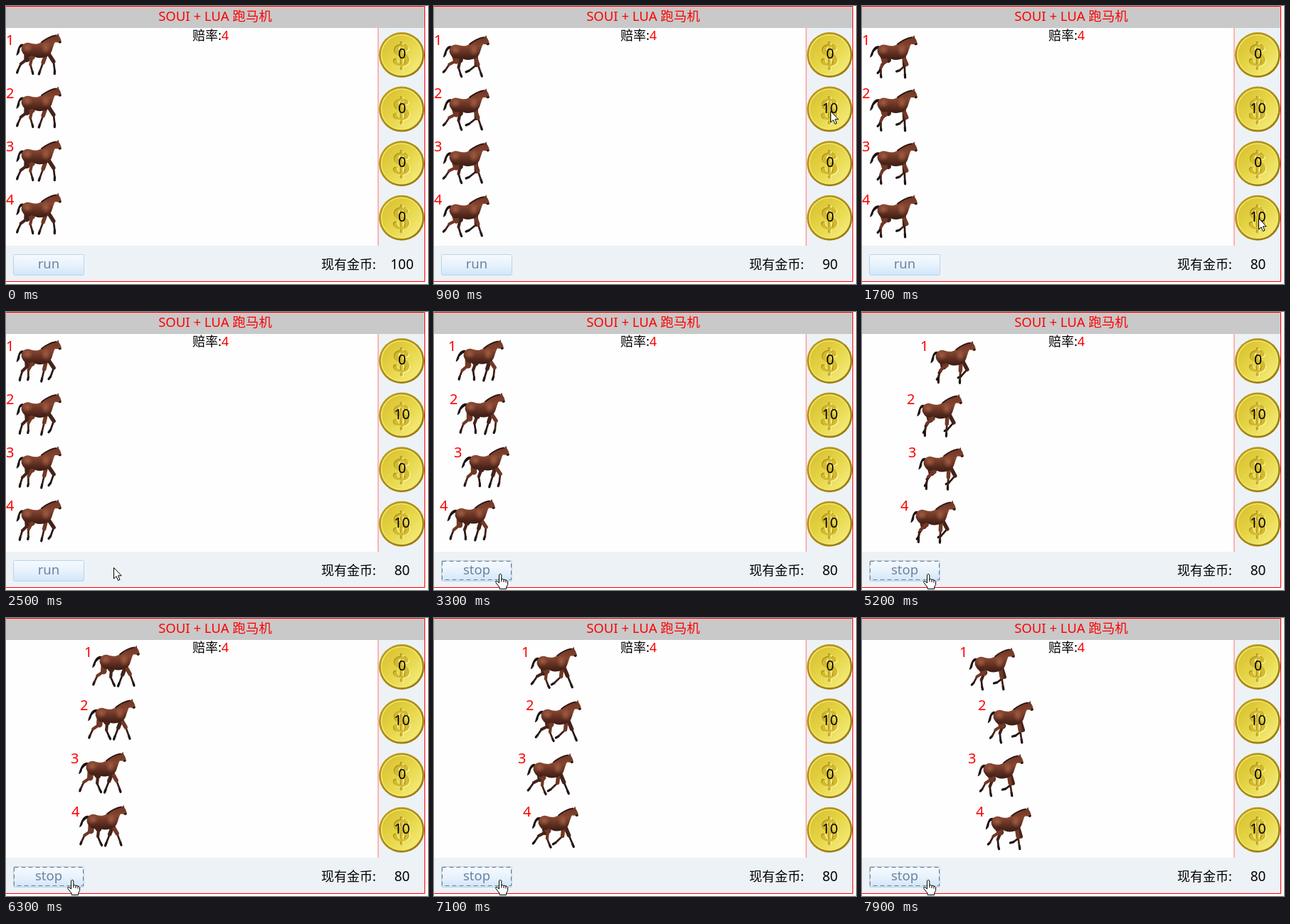
Recreate the animation shown at these times as an HTML page. Size 593x392 px, loop 8 s.

```html
<!DOCTYPE html>
<html lang="zh">
<head>
<meta charset="utf-8">
<title>SOUI + LUA 跑马机</title>
<style>
  html, body { margin: 0; width: 100%; height: 100%; overflow: hidden; background: #fff; }
  svg { display: block; width: 593px; height: 392px; }
  text { font-family: "Noto Sans", "Noto Sans CJK SC", "Noto Sans CJK", sans-serif; font-size: 18px; }
  .mid { text-anchor: middle; }
  .red { fill: #f00; }
  .num { font-size: 19.5px; }
  .emboss { font: bold 48px "Noto Serif", serif; text-anchor: middle; }
  .leg path { fill: none; stroke-linecap: round; stroke-linejoin: round; }
</style>
</head>
<body>
<svg viewBox="0 0 593 392">
  <defs>
    <linearGradient id="face" x1="0" y1="0" x2="1" y2="1">
      <stop offset="0" stop-color="#d6bd2c"/>
      <stop offset=".5" stop-color="#e6d648"/>
      <stop offset="1" stop-color="#f8f087"/>
    </linearGradient>
    <linearGradient id="rim" x1="0" y1="0" x2="1" y2="1">
      <stop offset="0" stop-color="#c2a11c"/>
      <stop offset="1" stop-color="#94750c"/>
    </linearGradient>
    <linearGradient id="key" x1="0" y1="0" x2="0" y2="1">
      <stop offset="0" stop-color="#f6fafe"/>
      <stop offset=".5" stop-color="#e8f2fc"/>
      <stop offset="1" stop-color="#d0e6fa"/>
    </linearGradient>
    <linearGradient id="coat" x1="0" y1="0" x2="0" y2="1">
      <stop offset="0" stop-color="#6b3423"/>
      <stop offset=".45" stop-color="#854530"/>
      <stop offset="1" stop-color="#3a1a12"/>
    </linearGradient>
    <radialGradient id="sheen">
      <stop offset="0" stop-color="#b0674a" stop-opacity=".75"/>
      <stop offset="1" stop-color="#b0674a" stop-opacity="0"/>
    </radialGradient>
    <g id="coin">
      <circle r="32" fill="url(#rim)"/>
      <circle r="28.5" fill="url(#face)" stroke="#f2e770" stroke-width="1.5"/>
      <text class="emboss" x="-1" y="17" fill="#a88c17">$</text>
      <text class="emboss" x="1.2" y="18.5" fill="#fcf6a4">$</text>
      <text class="emboss" y="17.7" fill="#d3b92e">$</text>
    </g>
    <g id="horse">
      <g id="farLegs" class="leg"></g>
      <path id="tail" fill="#1c1312"/>
      <g id="nearLegs" class="leg"></g>
      <path fill="url(#coat)" d="M22 57C24 51 30 49.5 35 51.5C41 53.5 46 52.5 50 50C55 46 61 42 67 40.5L71 40L73.5 37.5L74.3 41C76.5 44 78 47.5 77.6 50C77 52 75 52 73.5 50.5C71.5 50 70 50.5 69 50C67 53 66 58 64.5 62C63 67 59 70.5 53 71.5C46 73.5 40 71 36 68.5C33 72 27 71 24 66C21.5 62 21.2 60 22 57Z"/>
      <ellipse cx="30" cy="58" rx="8" ry="7" fill="url(#sheen)"/>
      <ellipse cx="56" cy="58" rx="7" ry="9" fill="url(#sheen)"/>
      <path fill="none" stroke="#2a1512" stroke-width="1.8" stroke-linecap="round" d="M50 50C55 46 61 42 70 40.3"/>
      <path fill="#2a1512" d="M75 48.5L77.7 49C78 51.5 75.5 52.2 73.8 50.8Z"/>
    </g>
  </defs>

  <rect width="593" height="392" fill="#fff"/>
  <rect width="588" height="388" fill="#edf2f7"/>
  <rect width="588" height="31" fill="#c9c9c9"/>
  <rect y="31" width="522" height="307" fill="#fefefe"/>
  <rect x="522" y="31" width="2" height="307" fill="#ffb3b3"/>
  <path d="M0 .5H588.5V388.5H0" fill="none" stroke="#f00"/>
  <text class="mid red" x="294" y="21" style="font-size:18.5px">SOUI + LUA 跑马机</text>
  <text x="262" y="48">赔率:<tspan class="red">4</tspan></text>
  <g id="lanes"></g>
  <g id="coins"></g>

  <rect x="10.5" y="350.5" width="99" height="29" rx="2" fill="url(#key)" stroke="#b9d3eb"/>
  <rect id="focus" x="11.5" y="351.5" width="97" height="26" fill="none" stroke="#747b84" stroke-dasharray="6 4"/>
  <text id="label" class="mid" x="60" y="370" fill="#6b83a0" style="font-size:18.5px"></text>
  <text x="443" y="371">现有金币:</text>
  <text id="cash" class="mid" x="556.5" y="371" style="font-size:19px"></text>

  <g id="arrow" fill="#fff" stroke="#000">
    <path d="M.5 .5V16L4 12.7L6.6 18.5L9 17.4L6.5 11.8H11.2Z"/>
  </g>
  <g id="hand" fill="#fff" stroke="#000" stroke-linejoin="round">
    <path d="M-1.5 1.5Q0 -.8 1.8 1.5V8Q3.6 6.6 5 8.6Q6.8 7.6 8 9.4Q9.8 8.8 10.6 10.6V15.5L8.6 19V21.5H-.8V19.5L-6 12.5Q-7 10.2 -4.8 10.3L-1.5 13Z"/>
    <path fill="none" d="M1.8 8V11.5M5 8.6V12M8 9.4V12.5"/>
  </g>
</svg>
<script>
const $ = id => document.getElementById(id);
const LOOP = 8000, STEP = 100, POSES = 13;
const holds = [32, 45, 53, 60];          // steps at which the race stands still
const marks = [27, 32, 40, 43, 50, 56, 59, 65, 75];
const runs = [
  [0, 20, 50, 57, 82, 101, 110, 120, 137],
  [0, 22, 41, 48, 63, 91, 104, 121, 163],
  [0, 28, 43, 48, 65, 82, 91, 110, 149],
  [0, 8, 21, 32, 54, 75, 92, 116, 160]
];
const mouse = {
  t: [0, 600, 1000, 1500, 1800, 2600],
  x: [620, 557, 557, 557, 557, 93],
  y: [120, 148, 148, 299, 299, 369]
};

function lerp(xs, ys, x) {
  if (x <= xs[0]) return ys[0];
  for (let i = 1; i < xs.length; i++)
    if (x <= xs[i]) return ys[i - 1] + (ys[i] - ys[i - 1]) * (x - xs[i - 1]) / (xs[i] - xs[i - 1]);
  return ys[ys.length - 1];
}

// Draws a leg from [length, angle, width, colour] links; a positive angle points forward.
function leg(x, y, links) {
  return links.map(([len, a, w, c]) => {
    const from = `${x.toFixed(1)} ${y.toFixed(1)}`;
    x += len * Math.sin(a);
    y += len * Math.cos(a);
    return `<path d="M${from}L${x.toFixed(1)} ${y.toFixed(1)}" stroke="${c}" stroke-width="${w}"/>`;
  }).reverse().join("");
}

const HOOF = "#16100f";

function foreLeg(x, phase, coat, dark) {
  const a = .05 + .42 * Math.cos(phase), bend = Math.max(0, -Math.sin(phase));
  return leg(x, 65, [
    [14.5, a + bend * .35, 5.5, coat],
    [13, a - bend * .9, 2.7, dark],
    [4.5, a - bend * 1.3, 3.2, HOOF]
  ]);
}

function hindLeg(x, phase, coat, dark) {
  const a = .45 * Math.cos(phase), bend = Math.max(0, -Math.sin(phase));
  return leg(x, 61, [
    [13, a * .8 + .3 + bend * .25, 8.5, coat],
    [11, a - .5 - bend * .4, 4.2, coat],
    [10, a - bend * .4, 2.7, dark],
    [3.5, a + .1 - bend * .8, 3.2, HOOF]
  ]);
}

function pose(n) {
  const a = 2 * Math.PI * n / POSES;
  const lead = a - .36, trail = lead + Math.PI;
  const far = ["#45231a", "#2a1711"], near = ["#713825", "#3f2017"];
  $("farLegs").innerHTML = foreLeg(59, lead, ...far) + hindLeg(30, trail, ...far);
  $("nearLegs").innerHTML = foreLeg(57, trail, ...near) + hindLeg(28, lead, ...near);
  const tip = 12.5 - 2 * Math.cos(a - 2.66);
  $("tail").setAttribute("d", `M25 53C19 51 ${tip + 3} 56 ${tip} 69C${tip + 3} 68 ${tip + 5} 65 ${tip + 5} 62C19 58 21 56 24 57Z`);
  return 2.6 - 1.6 * Math.cos(2 * a);
}

$("lanes").innerHTML = runs.map((_, i) =>
  `<g><text class="red" y="${55 + 75 * i}" style="font-size:20px">${i + 1}</text><use href="#horse"/></g>`).join("");
$("coins").innerHTML = runs.map((_, i) =>
  `<use href="#coin" x="556" y="${69 + 76.6 * i}"/><text class="mid num" x="556.5" y="${74 + 76.6 * i}"></text>`).join("");
const lanes = [...$("lanes").children];
const bets = [...$("coins").querySelectorAll("text")];

function render(t) {
  const k = Math.floor(t / STEP), now = k * STEP;
  const n = k - holds.filter(h => k >= h).length;
  const bob = pose(n);
  lanes.forEach((g, i) => {
    g.setAttribute("transform", `translate(${Math.round(lerp(marks, runs[i], n))} 0)`);
    g.lastChild.setAttribute("transform", `translate(0 ${(75 * i + bob).toFixed(2)})`);
  });

  const second = now >= 800 ? 10 : 0, fourth = now >= 1600 ? 10 : 0;
  [0, second, 0, fourth].forEach((v, i) => bets[i].textContent = v);
  $("cash").textContent = 100 - second - fourth;

  const racing = now >= 2800;
  $("label").textContent = racing ? "stop" : "run";
  $("focus").style.display = racing ? "" : "none";

  const x = lerp(mouse.t, mouse.x, now), y = lerp(mouse.t, mouse.y, now);
  const onKey = x < 110 && y > 350;
  for (const [id, on] of [["arrow", !onKey], ["hand", onKey]]) {
    $(id).style.display = on ? "" : "none";
    $(id).setAttribute("transform", `translate(${Math.round(x)} ${Math.round(y)})`);
  }
}

const start = performance.now();
function tick() {
  render((performance.now() - start) % LOOP);
  requestAnimationFrame(tick);
}
tick();
</script>
</body>
</html>
```
